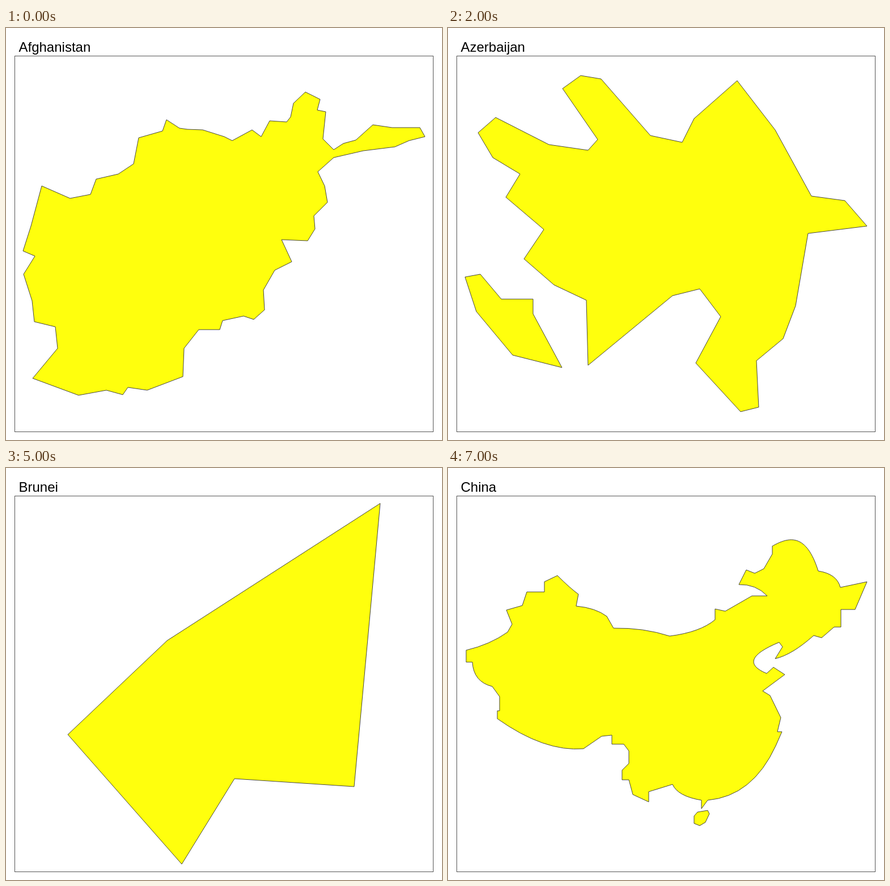
Animation, 769 px wide and 728 px high, one loop 8000 ms. Source, as an HTML page:

```html
<!DOCTYPE html>
<html lang="en">
<head>
<meta charset="utf-8">
<title>Country outlines</title>
<style>
  html, body { margin: 0; width: 100%; height: 100%; overflow: hidden; background: #fff; }
  svg { display: block; }
  g { visibility: hidden; }
  g.on { visibility: visible; }
  rect { fill: none; stroke: #555; }
  polygon, path { fill: #ffff0d; stroke: #333; stroke-width: .9; stroke-linejoin: round; }
  text { font: 24px Arial, "Liberation Sans", sans-serif; fill: #000; }
</style>
</head>
<body>
<svg width="769" height="728" viewBox="0 0 769 728">
  <rect x="15.5" y="49.5" width="738" height="664"/>
  <g>
    <text x="22.5" y="41.6">Afghanistan</text>
    <polygon points="63,279 113,301 149,294 159,267 198,258 225,240 234,194 276,182 283,162 306,177 320,179 347,180 385,192 399,199 434,180 450,192 465,164 495,166 502,157 507,133 528,113 554,126 549,145 564,148 559,196 578,215 595,204 617,198 647,171 681,176 730,176 739,192 711,199 686,210 630,217 578,229 550,254 562,279 567,308 543,332 545,355 532,376 486,374 504,413 474,428 454,463 456,498 437,515 419,509 382,517 377,533 340,533 314,566 312,616 249,640 215,635 206,648 177,640 128,649 47,619 91,566 87,528 50,519 46,482 31,435 51,403 30,394 44,350"/>
  </g>
  <g>
    <text x="22.5" y="41.6">Armenia</text>
    <polygon points="100,102 371,62.5 411,129 485,173 446,237 550,324 495,405 577,474 665,516 669,693 599,700 519,553 520,514 434,514 376,446 336,453 259,378 114,316 133,191"/>
  </g>
  <g>
    <text x="22.5" y="41.6">Azerbaijan</text>
    <polygon points="30,440 57,435 94,479 150,479 150,505 201,600 114,578 50,501"/>
    <polygon points="53,185 84,158 178,206 247,216 264,197 202,107 234,84 270,90 357,190 413,202 434,160 510,93 577,180 641,297 700,305 739,350 635,363 613,491 591,549 544,588 548,670 516,678 437,592 481,510 444,461 396,473 247,596 244,481 187,454 134,408 169,356 102,299 127,258 79,229"/>
  </g>
  <g>
    <text x="22.5" y="41.6">Bangladesh</text>
    <polygon points="617,549 615,628 579,611 586,700 557,643 551,586 532,533 490,469 396,465 406,510 374,572 331,549 316,569 287,557 248,547 232,456 197,373 215,307 152,277 175,237 238,196 165,137 201,62.5 281,110 329,116 338,192 434,208 528,206 587,225 540,318 495,325 463,387 519,445 535,374 563,374"/>
  </g>
  <g>
    <text x="22.5" y="41.6">Bhutan</text>
    <polygon points="30,432 173,251 289,190 443,246 557,252 651,317 739,394 724,544 547,551 366,535 231,573 35,481"/>
  </g>
  <g>
    <text x="22.5" y="41.6">Brunei</text>
    <polygon points="109,471 284,305 660,62.5 640,281 614,563 403,549 310,700"/>
  </g>
  <g>
    <text x="22.5" y="41.6">Cambodia</text>
    <polygon points="30,262 116,147 290,121 416,140.5 528,195 588,100 708,150.5 739,242 722,408 496,514 555,597 414,607 297,663 185,643 130,571 62,429"/>
  </g>
  <g>
    <text x="22.5" y="41.6">China</text>
    <path d="M739,201 L692,211 Q686,187 653,182 C632,115 602,121 572,138 V152
      L557,178 541,186 526,180 513,206 Q543,205 563,226 H536 L489,253 471,249 V268
      Q445,290 391,297 Q345,282 292,283 L280,262 Q260,247 226,244 L230,223
      Q215,212 193,190 L170,201 V219 H139 L131,243 103,251 113,276 105,290
      Q74,312 32,322 V343 H43 Q45,378 78,386 L91,404 V429 H87 V443
      Q170,502 239,496 L271,474 289,472 V488 H310 L319,500 V522 L307,534 V551 H319
      L326,577 354,590 V572 L396,559 Q405,580 447,587 V602 L458,587
      Q537,580 578,491 L589,466 H581 L587,441 568,402 555,394 594,365 574,352 562,363
      Q507,340 584,308 L590,316 577,337 Q607,330 645,296 L659,300 681,281
      H693 V250 H718 Z"/>
    <polygon points="434,615 440,608 458,605 461,611 454,626 444,632 434,628"/>
  </g>
</svg>
<script>
  const slides = [...document.querySelectorAll('g')];
  const slideMs = 1000;

  function draw() {
    const current = Math.floor(performance.now() / slideMs) % slides.length;
    slides.forEach((slide, i) => slide.classList.toggle('on', i === current));
    requestAnimationFrame(draw);
  }
  draw();
</script>
</body>
</html>
```
